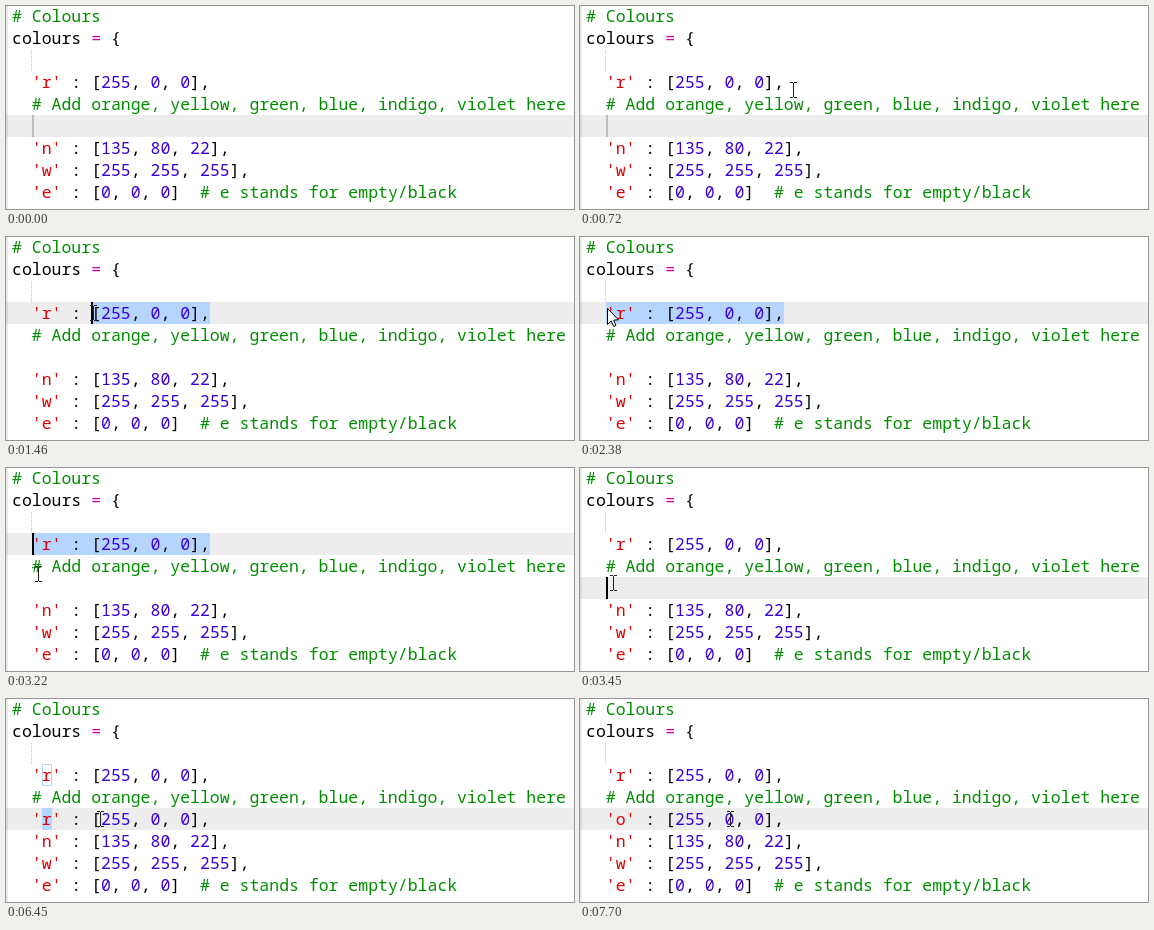
Recreate the animation shown at these times as an HTML page with a canvas. Size 568 by 203 pixels, loop 8 s.

```html
<!DOCTYPE html>
<html lang="en">
<head>
<meta charset="utf-8">
<title>Editing a colour table</title>
<style>
  html, body { margin: 0; width: 100%; height: 100%; overflow: hidden; background: #fff; }
  canvas { display: block; }
</style>
</head>
<body>
<canvas id="stage" width="568" height="203"></canvas>
<script>
const ctx = document.getElementById('stage').getContext('2d', { alpha: false });
const LOOP = 8000, LEFT = 6, CELL = 9.895, ROW = 22;
const FONT = '16.49px "Noto Sans Mono", "DejaVu Sans Mono", monospace';
const SELECTION = '#b5d5ff';

// Event times in ms
const FOCUS = 970, SELECTED = 1820, CLICK = 3450, PASTE = 4380, CLICK_KEY = 5350, KEY_SELECTED = 5580, TYPE = 7100;
const CARET_OFF = [[2380, 2780], [3380, CLICK], [4050, PASTE], [4980, CLICK_KEY], [6140, 6540], [7700, LOOP]];

// Pointer path: time, x, y
const PATH = [
  [80, 437, 206], [770, 210, 82], [FOCUS, 210, 82], [1740, 34, 73], [SELECTED, 29, 71],
  [2790, 29, 71], [3400, 33, 115], [4890, 33, 115], [5070, 48, 120], [CLICK_KEY, 48, 120],
  [KEY_SELECTED, 40, 121], [6370, 40, 121], [6450, 94, 120], [6730, 216, 120],
  [6880, 216, 120], [7110, 238, 120], [7340, 238, 120], [7690, 150, 120]
];

const TOKENS = /#.*|'[^']*'|\d+|=|[^\s\d'=#]+/g;
const tokenColour = s =>
  s[0] === '#' ? '#008e00' :
  s[0] === "'" ? '#df0002' :
  s === '=' ? '#c800a4' :
  /\d/.test(s) ? '#3a00dc' : '#000';

const clamp = (v, lo, hi) => Math.min(hi, Math.max(lo, v));
const colX = col => Math.round(LEFT + col * CELL);
const rowY = row => row * ROW - 1;
const colAt = x => clamp(Math.round((x - LEFT) / CELL), 2, 20);

function rect(colour, x, y, w, h) {
  ctx.fillStyle = colour;
  ctx.fillRect(x, y, w, h);
}

function pointerAt(t) {
  const i = PATH.findIndex(p => p[0] > t);
  if (i <= 0) return PATH[i < 0 ? PATH.length - 1 : 0].slice(1);
  const [t0, x0, y0] = PATH[i - 1], [t1, x1, y1] = PATH[i];
  const u = (t - t0) / (t1 - t0);
  const k = t1 - t0 > 300 ? u * u * (3 - 2 * u) : u;
  return [Math.round(x0 + (x1 - x0) * k), Math.round(y0 + (y1 - y0) * k)];
}

function codeLines(t) {
  const added = t < PASTE ? '' : `  '${t < TYPE ? 'r' : 'o'}' : [255, 0, 0],`;
  return [
    '# Colours',
    'colours = {',
    '',
    "  'r' : [255, 0, 0],",
    '  # Add orange, yellow, green, blue, indigo, violet here',
    added,
    "  'n' : [135, 80, 22],",
    "  'w' : [255, 255, 255],",
    "  'e' : [0, 0, 0]  # e stands for empty/black"
  ];
}

// Caret position plus the column where a selection began, if any
function caretAt(t, x) {
  if (t < FOCUS) return { row: 5, col: 2 };
  if (t < CLICK) return { row: 3, col: t < SELECTED ? colAt(x) : 2, anchor: 20 };
  if (t < PASTE) return { row: 5, col: 2 };
  if (t < CLICK_KEY) return { row: 5, col: 20 };
  if (t < TYPE) return { row: 5, col: t < KEY_SELECTED ? colAt(x) : 3, anchor: 4 };
  return { row: 5, col: 4 };
}

function drawIBeam(x, y) {
  for (const end of [y - 8, y + 7]) {
    rect('#222', x - 3, end, 3, 1);
    rect('#222', x + 1, end, 3, 1);
  }
  rect('#222', x, y - 7, 1, 14);
}

function drawArrow(x, y) {
  ctx.beginPath();
  [[0, 0], [0, 16], [3.7, 12.5], [6.2, 18], [8.5, 17], [6.1, 11.6], [11, 11.3]]
    .forEach(([dx, dy]) => ctx.lineTo(x + dx + .5, y + dy + .5));
  ctx.closePath();
  ctx.fillStyle = '#fff';
  ctx.fill();
  ctx.strokeStyle = '#000';
  ctx.lineWidth = 1;
  ctx.stroke();
}

function draw(t) {
  const [x, y] = pointerAt(t);
  const { row, col, anchor = col } = caretAt(t, x);
  const top = rowY(row);

  rect('#fff', 0, 0, 568, 203);
  rect('#e8e8e8', 0, 0, 2, 203);
  rect('rgba(0,0,0,.071)', 0, top, 568, ROW);
  rect(SELECTION, colX(col), top, colX(anchor) - colX(col), ROW);

  // Matching word in the other row
  if (row === 5 && anchor - col === 1) {
    ctx.strokeStyle = SELECTION;
    ctx.lineWidth = 1;
    ctx.strokeRect(colX(3) + .5, rowY(3) + .5, colX(4) - colX(3) - 1, ROW - 1);
  }

  // Indent guide
  for (let dot = 44; dot < 65; dot += 2) rect('#c4c4c4', 25, dot, 1, 1);

  ctx.font = FONT;
  codeLines(t).forEach((line, i) => {
    for (const token of line.matchAll(TOKENS)) {
      ctx.fillStyle = tokenColour(token[0]);
      ctx.fillText(token[0], LEFT + token.index * CELL, rowY(i) + 17);
    }
  });

  if (!CARET_OFF.some(([from, to]) => t >= from && t < to)) {
    rect(t < FOCUS ? 'rgba(0,0,0,.2)' : '#000', colX(col), top, 2, ROW);
  }

  if (t < 80) return;
  const overSelection = (t >= 2150 && t < CLICK && y < rowY(4)) || (t >= 5860 && t < TYPE && x < 47);
  overSelection ? drawArrow(x - 2, y) : drawIBeam(x, y);
}

const start = performance.now();
function tick() {
  draw((performance.now() - start) % LOOP);
  requestAnimationFrame(tick);
}
tick();
</script>
</body>
</html>
```
